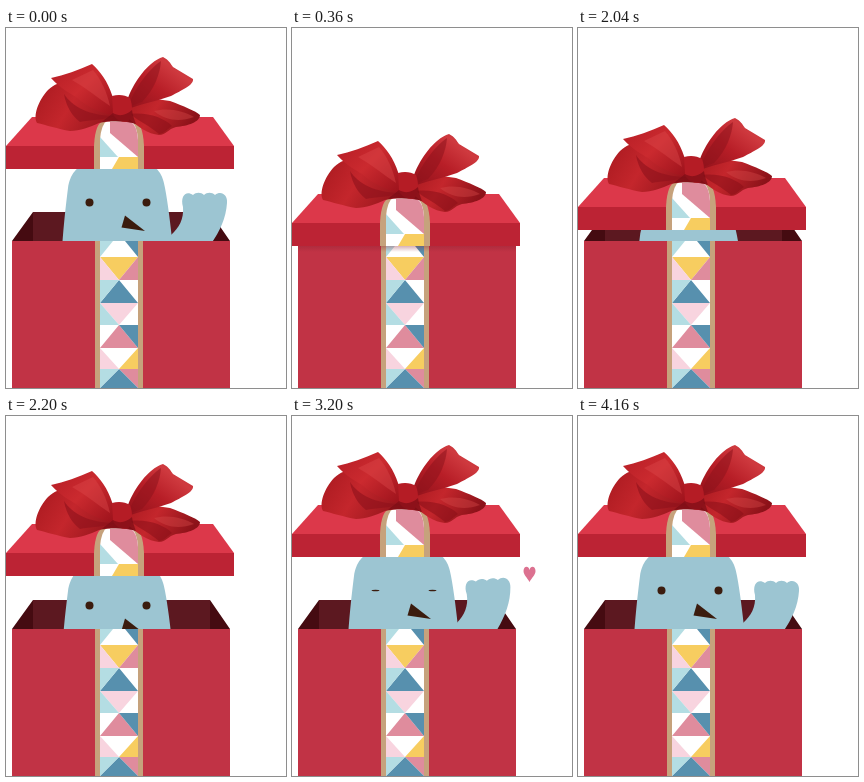
Recreate the animation shown at these times as an HTML page. Size 280 px wide and 360 px high, loop 4600 ms.

```html
<!DOCTYPE html>
<html lang="en">
<head>
<meta charset="utf-8">
<title>Bird in a gift box</title>
<style>
html, body { margin: 0; height: 100%; overflow: hidden; background: #fff; }
svg { display: block; width: 100vw; height: 100vh; }
.bird { fill: #9cc5d2; }
.dark { fill: #3b1c0e; }
.beige { fill: #c6a27c; }
.white { fill: #fff; }
.yellow { fill: #f7cd60; }
.blue { fill: #5790ae; }
.aqua { fill: #b4dde3; }
.pale { fill: #f8d4df; }
.rose { fill: #df8c9d; }
</style>
</head>
<body>
<svg viewBox="0 0 280 360">
  <defs>
    <clipPath id="frontClip"><path d="M6 213H224V360H6Z"/></clipPath>
    <linearGradient id="shade" x2="0" y2="1">
      <stop stop-color="#8e1f30" stop-opacity=".35"/>
      <stop offset="1" stop-color="#8e1f30" stop-opacity="0"/>
    </linearGradient>
    <linearGradient id="loopL" x2="1" y2=".8">
      <stop stop-color="#b51d25"/><stop offset=".5" stop-color="#cb2a2f"/>
      <stop offset="1" stop-color="#a0141d"/>
    </linearGradient>
    <linearGradient id="loopR" x1="0" y1="1" x2="1" y2="0">
      <stop stop-color="#8e111a"/><stop offset=".45" stop-color="#b81e27"/>
      <stop offset=".75" stop-color="#cf3a3f"/><stop offset="1" stop-color="#b9222a"/>
    </linearGradient>
    <linearGradient id="tail" x2="1" y2=".3">
      <stop stop-color="#a8191f"/><stop offset=".45" stop-color="#c4262c"/>
      <stop offset="1" stop-color="#8c1219"/>
    </linearGradient>
  </defs>

  <!-- inside of the box -->
  <path fill="#5c1820" d="M27 184H204V214H27Z"/>
  <path fill="#450b11" d="M27 184V213H6ZM204 184V213H224Z"/>

  <path id="heart" fill="#dc7190" d="M0 8C-2 4-6 1-6-3C-6-8-1-9 0-4C1-9 6-8 6-3C6 1 2 4 0 8Z"/>
  <g id="bird">
    <path class="bird" d="M56 220C58 192 60 176 62 160C64 147 70 137 85 135H137C152 137 157 147 159 160C162 176 164 192 167 220Z"/>
    <ellipse class="eye dark" cx="83.5" cy="174.5" rx="4"/>
    <ellipse class="eye dark" cx="140.5" cy="174.5" rx="4"/>
    <path class="dark" d="M119 187.500L139 203L115.500 199.500Z"/>
  </g>
  <path id="hand" class="bird" d="M165 207C173 200 178 191 177 179C174 168 180 162 187 167C190 164 195 164 198 167C201 164 206 164 209 167C215 162 222 167 221 175C220 190 214 203 205 216L200 226H163Z"/>

  <!-- front of the box; the ribbon is a column of hourglasses -->
  <path fill="#c13345" d="M6 213H224V360H6Z"/>
  <path class="beige" d="M89 213H137V360H89Z"/>
  <path class="white" d="M94 213H132V360H94Z"/>
  <path class="yellow" d="M94 229H132L113 252ZM132 320V341H113Z"/>
  <path class="pale" d="M94 229V252H113ZM94 275H132L113 297ZM94 320V341H113Z"/>
  <path class="rose" d="M132 229V252H113ZM113 297L132 320H94ZM113 341H132V360Z"/>
  <path class="blue" d="M119 213H132V229ZM113 252L132 275H94ZM113 297H132V320ZM113 341L132 360H94Z"/>
  <path class="aqua" d="M94 213H107L94 229ZM94 252H113L94 275ZM94 275V297H113ZM94 341H113L94 360Z"/>

  <g clip-path="url(#frontClip)">
    <rect id="shadow" y="141" width="228" height="6" fill="url(#shade)"/>
  </g>

  <g id="lid">
    <path fill="#dc384a" d="M26 89H207L228 118H0Z"/>
    <path fill="#bc2334" d="M0 118H228V141H0Z"/>
    <path class="beige" d="M88 141V118Q89 94 99 92H127Q137 94 138 118V141Z"/>
    <path class="white" d="M94 141V112Q95 96 102 92H124Q131 96 132 112V141Z"/>
    <path class="rose" d="M104 105V94H125Q131 97 132 112V129Z"/>
    <path class="aqua" d="M94 109L112 129H94Z"/>
    <path class="yellow" d="M113 129H132V141H106Z"/>

    <!-- bow -->
    <path fill="url(#tail)" d="M118 78C124 86 128 92 130 96C120 93 104 93 93 95C84 99 74 103 64 103C52 101 40 97 31 95C27 88 32 73 42 62C52 53 62 52 72 56C88 66 104 76 118 78Z"/>
    <path fill="#8e121b" opacity=".6" d="M58 66C66 78 82 88 110 88C98 92 84 92 74 94C66 88 60 78 58 66Z"/>
    <path fill="url(#loopL)" d="M45 50C58 47 73 42 86 36C94 43 102 54 106 67L113 88C98 87 82 80 70 69C62 64 54 60 45 50Z"/>
    <path fill="#dc4a4c" opacity=".4" d="M66 52L87 42C95 51 101 64 104 78C92 70 80 60 66 52Z"/>
    <path fill="url(#tail)" d="M118 80C132 71 150 70 164 73C177 78 190 83 194 87C194 94 182 98 170 99C162 101 160 107 153 107C142 106 132 99 122 90Z"/>
    <path fill="#d4494a" opacity=".4" d="M148 83C162 79 178 83 188 89C174 94 160 93 148 83Z"/>
    <path fill="#8a1018" opacity=".55" d="M124 86C142 84 158 90 166 98C160 102 158 106 153 106C144 98 134 94 124 86Z"/>
    <path fill="url(#loopR)" d="M119 82C121 66 133 46 145 36C150 32 153 30 157 29C163 32 164 35 167 39L187 51C188 57 176 62 165 68C148 74 134 76 119 82Z"/>
    <path fill="#8e131c" opacity=".55" d="M122 79C128 61 142 42 155 33C154 46 148 62 136 74Z"/>
    <path fill="#b51c25" d="M106 68C113 66 119 67 124 70C127 78 127 88 122 94C114 94 109 91 107 86Z"/>
    <path fill="#7d0d16" opacity=".7" d="M107 85C114 89 120 87 126 82C127 89 129 93 130 96C119 92 105 92 96 94C100 90 104 88 107 85Z"/>
  </g>
</svg>
<script>
const $ = id => document.getElementById(id);
const eyes = document.querySelectorAll('.eye');
const LOOP = 4600, STEP = 40;
const clamp = (v, a = 0, b = 1) => Math.min(b, Math.max(a, v));
const part = (t, a, b) => clamp((t - a) / (b - a));
const set = (id, transform) => $(id).setAttribute('transform', transform);

function draw(t) {
  // 0 = open, 1 = closed
  const closed = t < 2000 ? part(t, 0, 360) ** 2 : (1 - part(t, 2000, 2540)) ** 3;
  const shake = t >= 1000 && t < 1200 ? Math.sin((t - 1000) / 200 * 2 * Math.PI) : 0;
  const lidMove = `translate(${2 * shake} ${Math.round(77 * closed - Math.abs(shake))})`;
  set('lid', lidMove);
  set('shadow', lidMove);
  set('bird', `translate(0 ${60 * closed})`);

  const blink = clamp(Math.abs(t - 3200) / 100, .2, 1);
  eyes.forEach(e => e.setAttribute('ry', 4 * blink));

  // the hand leaves with the bird, comes up after it, then waves
  const down = 1 - Math.sin(part(t, 2560, 2720) * Math.PI / 2);
  const wave = -6.3 * Math.sin(part(t, 2900, 3440) * 4 * Math.PI);
  const [handX, handY] = t < 2000 ? [0, 60 * closed] : [-14 * down, 52 * down];
  set('hand', `translate(${handX} ${handY}) rotate(${wave} 166 210)`);

  const s = t - 3200;
  const x = 240.5 + 28.5 * Math.cos((t - 3600) / 1500 * 2 * Math.PI);
  const y = 158 - .15 * s + 8e-6 * s * s;
  set('heart', `translate(${x} ${y}) scale(${part(t, 2920, 3160)})`);
  $('heart').setAttribute('opacity', 1 - part(t, 4000, 4160));
}

const start = performance.now();
function tick() {
  const t = (performance.now() - start) % LOOP;
  draw(Math.floor(t / STEP) * STEP);
  requestAnimationFrame(tick);
}
tick();
</script>
</body>
</html>
```
